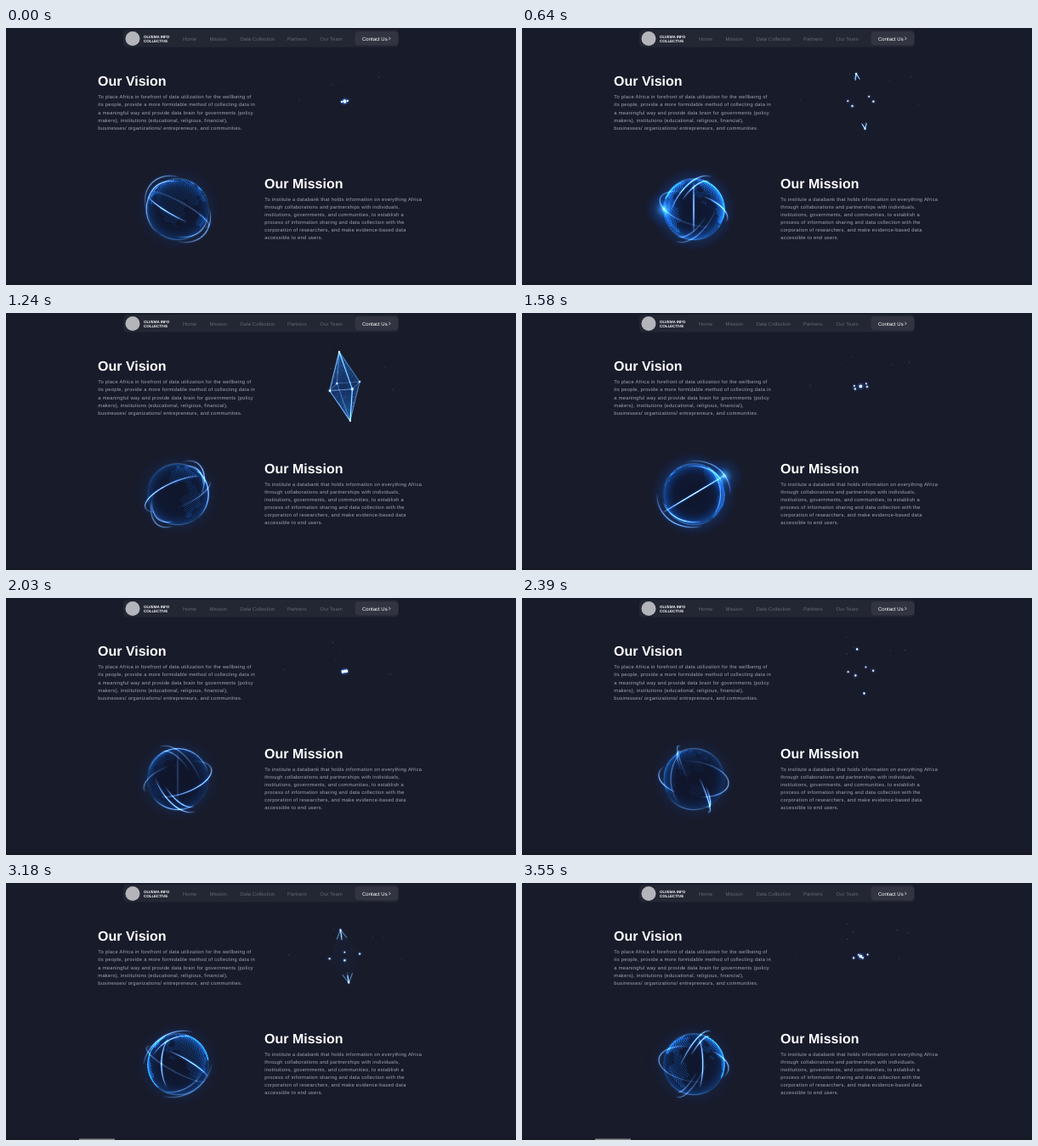
Animation, 600 px wide and 303 px high, one loop 3.61 s. Source, as an HTML page with a canvas:

```html
<!DOCTYPE html>
<html lang="en">
<head>
<meta charset="utf-8">
<title>Vision and mission</title>
<style>
html, body { margin: 0; width: 100%; height: 100%; overflow: hidden; background: #181b2a; }
svg, canvas { position: absolute; left: 0; top: 0; width: 600px; height: 303px; }
text { font-family: "Liberation Sans", Arial, sans-serif; text-rendering: geometricPrecision; }
.nav text { font-size: 6px; fill: #646773; }
.nav .cta { fill: #fff; }
.nav .brand { font-size: 4.6px; font-weight: bold; letter-spacing: -.1px; fill: #f4f4f6; }
.head { font-size: 16px; font-weight: bold; fill: #fff; }
.copy { font-size: 5.8px; letter-spacing: .26px; fill: #a3a5b1; }
.thumb { visibility: hidden; animation: thumb 3610ms step-end infinite; }
@keyframes thumb {
  0% { visibility: hidden; }
  70% { visibility: visible; transform: translateX(42px); }
  82%, 100% { visibility: visible; transform: none; }
}
</style>
</head>
<body>
<svg viewBox="0 0 600 303">
  <g class="nav">
    <rect x="138" y="2" width="324" height="20.5" rx="4.5" fill="#232633"/>
    <rect x="410.500" y="4" width="51" height="16.5" rx="4.5" fill="#323541"/>
    <circle cx="149" cy="12.5" r="8.5" fill="#b4b5bb"/>
    <text class="brand" x="162" y="11.6">OLVEMA INFO</text>
    <text class="brand" x="162" y="16.6">COLLECTIVE</text>
    <text x="208" y="14.6">Home</text>
    <text x="239.5" y="14.6">Mission</text>
    <text x="275.5" y="14.6">Data Collection</text>
    <text x="331" y="14.6">Partners</text>
    <text x="369.5" y="14.6">Our Team</text>
    <text class="cta" x="419" y="14.6">Contact Us</text>
    <path d="M450.500 10.700l1.500 1.700-1.500 1.700" fill="none" stroke="#fff" stroke-width=".7"/>
  </g>
  <text class="head" x="108" y="68.4">Our Vision</text>
  <g id="vision" class="copy"></g>
  <text class="head" x="304" y="188.8">Our Mission</text>
  <g id="mission" class="copy"></g>
  <rect y="300" width="600" height="3" fill="#171923"/>
  <rect class="thumb" x="86" y="301.5" width="42" height="1.5" fill="#85868c"/>
</svg>
<canvas id="stage"></canvas>
<script>
const LOOP = 3610, CRYSTAL = 1805, GLOBE = 2780, RAD = Math.PI / 180, TAU = 2 * Math.PI;

function addCopy(id, x, y, lines) {
  lines.forEach((line, i) => {
    const el = document.createElementNS('http://www.w3.org/2000/svg', 'text');
    el.setAttribute('x', x);
    el.setAttribute('y', y + i * 9.17);
    el.textContent = line;
    document.getElementById(id).append(el);
  });
}
addCopy('vision', 108.3, 83.3, [
  'To place Africa in forefront of data utilization for the wellbeing of',
  'its people, provide a more formidable method of collecting data in',
  'a meaningful way and provide data brain for governments (policy',
  'makers), institutions (educational, religious, financial),',
  'businesses/ organizations/ entrepreneurs, and communities.']);
addCopy('mission', 304.3, 203.6, [
  'To institute a databank that holds information on everything Africa',
  'through collaborations and partnerships with individuals,',
  'institutions, governments, and communities, to establish a',
  'process of information sharing and data collection with the',
  'corporation of researchers, and make evidence-based data',
  'accessible to end users.']);

const canvas = document.getElementById('stage'), ctx = canvas.getContext('2d');
const dpr = window.devicePixelRatio || 1;
canvas.width = 600 * dpr;
canvas.height = 303 * dpr;

function seeded(seed) {
  return () => (seed = (seed * 16807) % 2147483647) / 2147483647;
}
const lerp = (a, b, u) => a + (b - a) * u;

// Smooth step from 0 to 1 between two times.
function ramp(t, from, to) {
  const u = Math.min(1, Math.max(0, (t - from) / (to - from)));
  return u * u * (3 - 2 * u);
}
// Rises over the first span and falls over the second.
const pulse = (t, a, b, c, d) => ramp(t, a, b) - ramp(t, c, d);

function line(a, b, width, colour) {
  ctx.strokeStyle = colour;
  ctx.lineWidth = width;
  ctx.beginPath();
  ctx.moveTo(a[0], a[1]);
  ctx.lineTo(b[0], b[1]);
  ctx.stroke();
}

function glow(x, y, r, stops) {
  const g = ctx.createRadialGradient(x, y, 0, x, y, r);
  stops.forEach(([at, colour]) => g.addColorStop(at, colour));
  ctx.fillStyle = g;
  ctx.fillRect(x - r, y - r, r * 2, r * 2);
}

/* ---------- crystal ---------- */
const spark = ([x, y], r) => glow(x, y, r * 3, [
  [0, '#fff'], [.25, 'rgba(220,234,255,.85)'], [.45, 'rgba(80,130,220,.25)'], [1, 'rgba(40,90,220,0)']]);
const mix = (a, b, u) => [lerp(a[0], b[0], u), lerp(a[1], b[1], u)];

function drawFaces(poles, ring, cx, cy, alpha) {
  const rnd = seeded(41);
  for (const p of poles) ring.forEach((a, i) => {
    const b = ring[(i + 1) % 4];
    const g = ctx.createLinearGradient(...p, cx, cy);
    g.addColorStop(0, `rgba(50,150,255,${.24 * alpha})`);
    g.addColorStop(1, `rgba(15,80,180,${.18 * alpha})`);
    ctx.fillStyle = g;
    ctx.beginPath();
    [p, a, b].forEach(v => ctx.lineTo(v[0], v[1]));
    ctx.fill();
    ctx.fillStyle = `rgba(70,160,255,${.4 * alpha})`;
    for (let k = 0; k < 28; k++) {
      const [x, y] = mix(p, mix(a, b, rnd()), Math.sqrt(rnd()));
      ctx.fillRect(x, y, .6, .6);
    }
  });
}

function drawCrystal(time) {
  const t = time % CRYSTAL;
  const R = 3.5 + 16.3 * ramp(t, 230, 750) - 9.8 * ramp(t, 1300, 1560) - 6.5 * ramp(t, 1720, CRYSTAL);
  const H = 41 * pulse(t, 300, 780, 1300, 1540);
  const edge = pulse(t, 540, 880, 1290, 1430), face = pulse(t, 820, 985, 1270, 1400);
  const cx = 398.4, cy = 86.4, spin = (t - 640) * 360 / CRYSTAL - 57;
  const poles = [[cx - .158 * H, cy - H], [cx + .158 * H, cy + H]];
  const ring = [0, 1, 2, 3].map(i => {
    const a = (spin + i * 90) * RAD, c = R * Math.cos(a), s = R * Math.sin(a);
    return [cx + c, cy - .16 * c + .27 * s, s / R];
  });

  if (face > 0) drawFaces(poles, ring, cx, cy, face);
  if (edge > 0) {
    const around = Math.max(0, 2 * edge - 1);
    ring.forEach((v, i) => {
      const depth = .7 + .3 * v[2];
      for (const p of poles) {
        const end = mix(p, v, edge);
        line(p, end, 2, `rgba(50,140,255,${.25 * depth})`);
        line(p, end, .4 + .5 * depth, `rgba(200,228,255,${.8 * depth})`);
      }
      if (around > 0) line(v, mix(v, ring[(i + 1) % 4], around), .7, `rgba(180,216,255,${.75 * depth})`);
    });
  }
  ring.forEach(v => spark(v, 1.15 + .15 * v[2]));
  poles.forEach(p => spark(p, 1.6 - .8 * H / 41));
}

function drawDust(time) {
  const rnd = seeded(977);
  for (let i = 0; i < 7; i++) {
    const a = rnd() * TAU, from = 15 + 35 * rnd(), life = 700 + 700 * rnd();
    const u = (time / life + rnd()) % 1, d = from + 38 * u;
    ctx.fillStyle = `rgba(150,175,230,${.45 * Math.sin(Math.PI * u)})`;
    ctx.fillRect(401 + d * Math.cos(a), 88 + .62 * d * Math.sin(a), .9, .9);
  }
}

/* ---------- globe ---------- */
const GX = 202, GY = 213.5, GR = 36;

// Land blobs: longitude, latitude, half width, half height
const land = [[0, 40, 75, 32], [-15, 2, 24, 30], [55, -22, 17, 12], [-150, 42, 34, 24], [-133, -12, 18, 32]];
const COUNT = 4200;
const surface = Array.from({ length: COUNT }, (_, i) => {
  const y = 1 - 2 * (i + .5) / COUNT, lon = (i * 137.508) % 360 - 180, lat = Math.asin(y) / RAD;
  const wobble = .2 * Math.sin(lon * .19 + lat * .11) + .14 * Math.sin(lat * .31 - lon * .07);
  const isLand = land.some(([lo, la, w, h]) => Math.hypot((lon - lo) / w, (lat - la) / h) < 1 + wobble);
  return { lon: lon * RAD, y, ring: Math.sqrt(1 - y * y), isLand };
});

// Rings circling the globe; each arc is [middle, length] in degrees along the ring.
const beam = { incl: 31, phase: -25, size: 1.15, arcs: [[180, 180], [0, 90]] };
const rings = [
  beam,
  { incl: 90, phase: -83, size: 1.03, arcs: [[-5, 105]] },
  { incl: 65, phase: 60, size: 1.2, arcs: [[232, 105], [52, 105]] },
  { incl: 62, phase: 66, size: 1.04, arcs: [[240, 80], [60, 85]] }];
const rim = { incl: 90, phase: 90, size: 1, arcs: [[270, 150], [100, 85]] };

// Returns a function from angle on the ring to [x, y, depth].
function orbit({ incl, phase, size }, turn) {
  const si = Math.sin(incl * RAD), ci = Math.cos(incl * RAD);
  const sn = Math.sin(phase * RAD + turn), cn = Math.cos(phase * RAD + turn);
  return deg => {
    const c = Math.cos(deg * RAD), s = Math.sin(deg * RAD);
    return [
      GX + GR * size * (sn * c + ci * cn * s),
      GY + GR * size * si * s,
      cn * c - ci * sn * s];
  };
}

function drawRing(ring, turn, alpha) {
  const at = orbit(ring, turn), steps = 26;
  for (const [mid, length] of ring.arcs) for (let i = 0; i < steps; i++) {
    const a = mid + length * (i / steps - .5);
    const p = at(a), q = at(a + length / steps);
    const fade = Math.sin(Math.PI * (i + .7) / (steps + .4)) ** .6;
    const power = alpha * fade * (.62 + .38 * p[2]);
    line(p, q, 4.5, `rgba(15,90,230,${.16 * power})`);
    line(p, q, 2.2, `rgba(45,135,245,${.35 * power})`);
    line(p, q, .4 + .7 * fade, `rgba(215,234,252,${.95 * power})`);
  }
}

function drawGlobe(time) {
  const t = time % GLOBE, turn = t / GLOBE * TAU;
  const light = .85 + .45 * Math.cos(turn - 1.5);
  const flare = pulse(t, 480, 640, 660, 780) + pulse(t, 1340, 1570, 1600, 1850);

  ctx.fillStyle = 'rgba(10,16,38,.6)';
  ctx.beginPath();
  ctx.arc(GX, GY, GR, 0, TAU);
  ctx.fill();

  ctx.globalCompositeOperation = 'lighter';
  const edge = .2 + .25 * flare;
  glow(GX, GY, GR * 1.4, [
    [0, 'rgba(10,60,150,0)'], [.45, `rgba(10,60,150,${.2 * edge})`], [.68, `rgba(25,110,225,${edge})`],
    [.74, `rgba(20,90,200,${.5 * edge})`], [1, 'rgba(10,60,190,0)']]);

  for (const p of surface) {
    const z = p.ring * Math.cos(p.lon + turn);
    if (z < 0) continue;
    const alpha = (p.isLand ? .8 : .16) * (1 - .35 * z) * light;
    ctx.fillStyle = `rgba(28,112,215,${alpha})`;
    ctx.fillRect(GX + GR * p.ring * Math.sin(p.lon + turn), GY - GR * p.y, .95, .95);
  }

  rings.forEach(ring => drawRing(ring, turn, .85));
  drawRing(rim, 0, .25 + .6 * pulse(t, 1700, 2030, 2100, 2500));

  if (flare > 0) {
    const [x, y] = orbit(beam, turn)(180 + (t - 640) * 90 / 940);
    glow(x, y, 24, [
      [0, `rgba(150,215,255,${.9 * flare})`], [.15, `rgba(60,160,250,${.6 * flare})`],
      [.45, `rgba(20,95,200,${.25 * flare})`], [1, 'rgba(10,60,160,0)']]);
  }
}

function frame(now) {
  const t = now % LOOP;
  ctx.setTransform(dpr, 0, 0, dpr, 0, 0);
  ctx.clearRect(0, 0, 600, 303);
  ctx.globalCompositeOperation = 'source-over';
  drawGlobe(t);
  drawCrystal(t);
  drawDust(t);
  requestAnimationFrame(frame);
}
requestAnimationFrame(frame);
</script>
</body>
</html>
```
